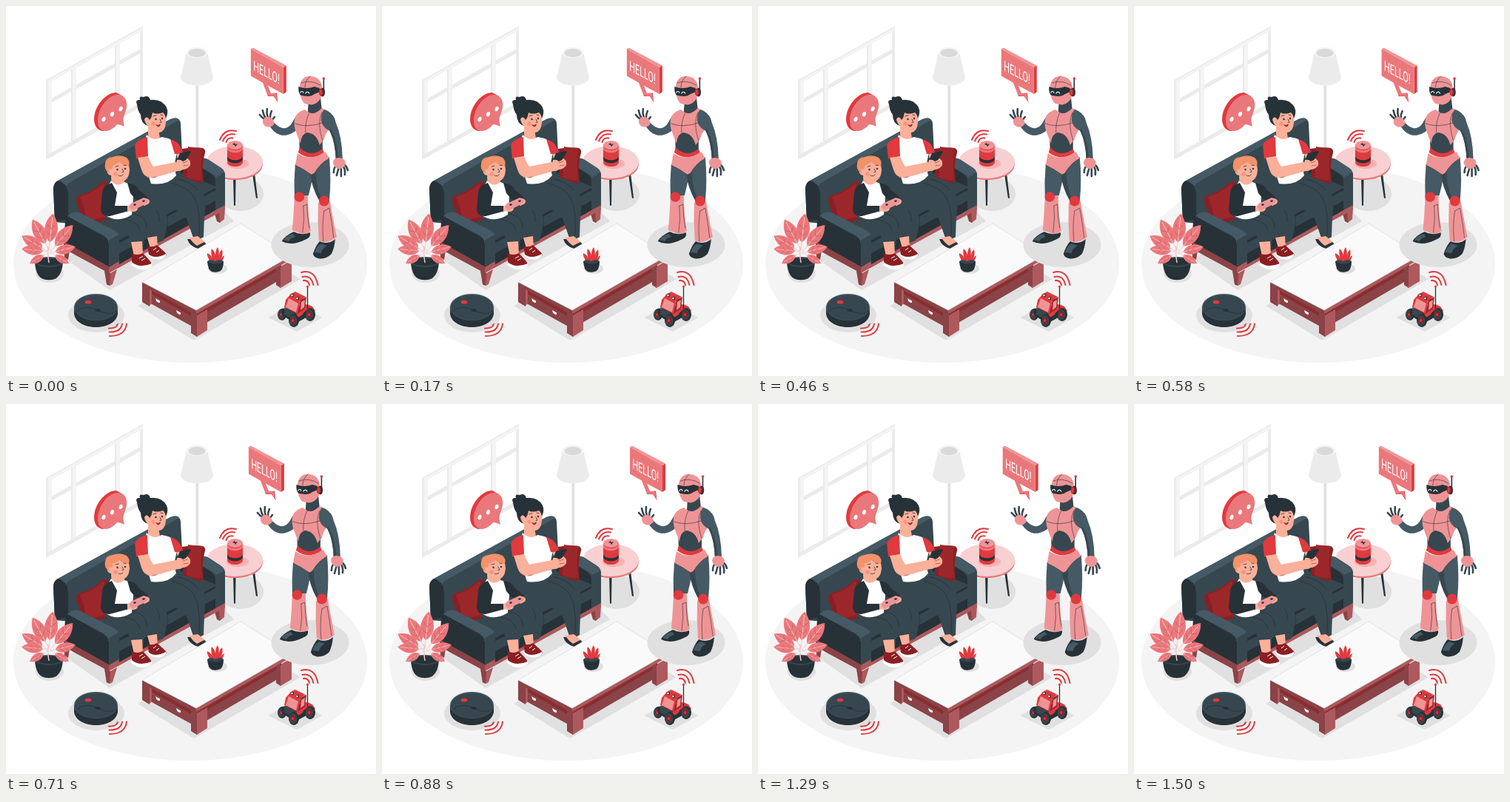
Write an HTML page that moves like this. It is 500 by 500 pixels and loops after 1.54 s.

```html
<!DOCTYPE html>
<html lang="en">
<head>
<meta charset="utf-8">
<title>Smart living room</title>
<style>
html, body { margin: 0; width: 100%; height: 100%; overflow: hidden; background: #fff; }
svg { display: block; width: 100vw; height: 100vh; }
.w { fill: #fff } .g0 { fill: #f4f4f4 } .g1 { fill: #ebebeb } .g2 { fill: #e0e0e0 }
.k { fill: #263238 } .d { fill: #37474f } .m { fill: #455a64 }
.r { fill: #e03a3e } .p { fill: #ea787b } .l { fill: #f8d0d2 } .q { fill: #ef9496 }
.b { fill: #8a1f23 } .c { fill: #9c272b } .t { fill: #8a4347 } .u { fill: #ad595d }
.s { fill: #fbb09a } .o { fill: #f1926a }
.ln { fill: none; stroke: #263238; stroke-linecap: round; stroke-linejoin: round; stroke-width: .8 }
.lr { fill: none; stroke: #a83a3f; stroke-width: .7; stroke-linecap: round }
.arc { fill: none; stroke: #e03a3e; stroke-width: 2; stroke-linecap: round }
.fin { fill: none; stroke: #37474f; stroke-width: 2.6; stroke-linecap: round }
.hello { font: 400 19px Roboto, "Open Sans", sans-serif; fill: #fff }
</style>
</head>
<body>
<svg viewBox="0 0 500 500">
<defs>
  <g id="leaf">
    <path class="p" d="M0-10C-11-18-11-34 0-46C11-34 11-18 0-10"/>
    <path d="M0 0V-42" fill="none" stroke="#f8c4c6" stroke-width=".9"/>
    <path class="lr" d="M0-18l-5-5M0-18l5-5M0-27l-5-5M0-27l5-5" opacity=".5"/>
  </g>
  <g id="wheel">
    <ellipse class="k" rx="7" ry="9"/>
    <ellipse class="d" cx="-1" rx="5.200" ry="7"/>
    <ellipse class="b" cx="-1" rx="3" ry="4.200"/>
    <ellipse class="r" cx="-1.400" rx="1.500" ry="2"/>
  </g>
</defs>

<ellipse class="g0" cx="249" cy="348" rx="239" ry="134"/>

<!-- window -->
<g transform="matrix(1 -.557 0 1 54 100)">
  <path class="g1" fill-rule="evenodd" d="M0 0H131V108H0ZM8 6V102H127V6Z"/>
  <path class="g0" d="M3 2H131V6H8V102H3Z"/>
  <path class="g1" d="M34 6h7v96h-7zM93 6h7v96h-7zM8 29H127v6H8z"/>
  <path class="g0" d="M36 6h5v96h-5zM95 6h5v96h-5z"/>
</g>

<!-- floor lamp -->
<path class="g2" d="M256.500 104h3.500v100h-3.500z"/>
<path class="g1" d="M244 63L236 96C237 111 279 111 280 96L272 63Z"/>
<ellipse class="g0" cx="258" cy="63" rx="14" ry="7.500"/>
<ellipse cx="258" cy="63.500" rx="11.500" ry="5.800" fill="#d9d9d9"/>

<!-- side table -->
<ellipse class="g2" cx="317" cy="254" rx="31" ry="23"/>
<path class="k" d="M307 231h3.500l-.5 38q-1 2-2 0zM333 227l3-1 4 33q-1 2-2.200 0zM279 225h3v30h-2z"/>
<path class="p" d="M271 210V214C273 242 345 242 347 214V210Z"/>
<ellipse class="l" cx="309" cy="211" rx="38" ry="22"/>
<ellipse class="q" cx="313" cy="213" rx="15" ry="7" opacity=".5"/>
<path class="r" d="M299 188V211C300 219 319 219 320 211V188Z"/>
<path class="k" d="M299 203C301 210 318 210 320 203V207C318 214 301 214 299 207Z"/>
<path class="p" d="M299 189C301 197 318 197 320 189V193C318 200 301 200 299 193Z"/>
<ellipse class="q" cx="309.500" cy="188" rx="10.500" ry="6"/>
<path class="k" d="M306 187l3-2 1 2 3-1-3 4-1-2z"/>
<path class="arc" d="M289 181Q295 165 311 169M293 182.500Q298 171 309 173.500M297.500 184Q300 177 306.500 178.500"/>

<!-- sofa -->
<path class="g2" d="M78 340L140 384 308 291 290 272Z"/>
<path class="u" d="M133 357l8 4 9-5-6 20-4 2-4-2zM282 281l14-8-1 15-6 5z"/>
<path class="t" d="M78 326l8 5-2 12-5-3zM133 357l8 4-1 17-4-2zM282 281l6-2 1 14-4-2z"/>
<path class="t" d="M78 316L139 350V361L78 328Z"/>
<path class="u" d="M139 350L296 262V275L139 361Z"/>
<path class="d" d="M64 247Q64 239 72 235L222 153Q235 148 236 159L240 240 150 300 66 292Z"/>
<path class="m" d="M72 235L222 153Q231 149 234 154L85 239Q81 242 82 247Q76 238 72 235Z"/>
<path class="k" d="M64 247Q64 239 70 236Q82 239 84 252V288L66 292Z"/>
<path class="k" d="M236 200L268 209 296 232V268L270 280 236 255Z"/>
<path class="d" d="M262 207Q268 204 274 208L291 219Q297 223 296 231V269L283 276V236Q282 230 276 226L258 215Z"/>
<path class="m" d="M262 207Q268 204 274 208L291 219Q294 221 295 225L284 231Q282 228 276 225L258 214Z"/>
<path class="d" d="M120 290L240 225 283 244V252L154 322Z"/>
<path class="k" d="M150 318L283 246V276L153 349Z"/>
<path class="d" d="M152 321L283 249V263L152 335Z"/>
<path class="ln" d="M154 336L282 265M218 285V300"/>

<!-- cushions -->
<path class="b" d="M238 193Q254 190 266 192Q271 194 268 202Q264 219 267 235Q266 240 261 239L240 233Z"/>
<path class="c" d="M246 190Q256 192 266 192Q262 210 265 235Q252 236 244 231Z"/>
<path class="b" d="M95 263Q94 258 99 256Q118 250 130 238Q136 235 139 241L149 284Q148 289 140 289Q123 291 111 297Q106 298 104 292Z"/>
<path class="c" d="M100 258Q120 251 132 239Q137 263 146 284Q124 285 109 293Q107 273 100 258Z"/>

<!-- woman -->
<path class="s" d="M192 160L206 166 208 179Q201 187 192 178Z"/>
<path class="s" d="M187 153Q187 148 191 150L196 142 214 141Q217 150 216 158Q215 170 207 171Q199 171 194 163Q187 160 187 153Z"/>
<path class="k" d="M177 133q-3-7 4-6-2-6 5-4 7-3 9 4Q210 125 217 137Q220 144 216 152Q215 146 212 144Q203 147 198 144Q197 151 194 154Q190 147 187 153Q188 159 192 162Q182 159 182 147Q178 142 177 133Z"/>
<path class="ln" d="M199 149l4-1.500M209 147l3 .5M208 153l2 4-2 .5"/>
<circle class="k" cx="202.500" cy="153" r="1.200"/><circle class="k" cx="211" cy="152" r="1.200"/>
<path class="c" d="M202 160q4 2 7-1-1 5-4 4-2-1-3-3"/>
<circle class="r" cx="199" cy="159" r="2.500" opacity=".25"/>
<path class="d" d="M197 239Q220 228 240 232Q260 235 267 251Q271 264 268 284L267 312 255 319 244 287 233 277Q200 268 197 239Z"/>
<path class="ln" d="M224 239Q247 245 255 260T261 310M233 234Q250 237 259 249"/>
<path class="s" d="M247 313l12-2 9 7q2 4-2 5l-9 3q-7-6-10-13"/>
<path class="k" d="M245 315l4 0q4 6 9 9l10-5q3 2 2 4l-10 5q-12-3-15-13"/>
<path class="w" d="M190 174Q200 184 210 177Q222 178 229 185L230 203Q226 217 230 229Q219 243 196 240Q188 214 182 203Z"/>
<path class="r" d="M191 177Q177 180 174 188L176 206Q185 206 192 203Z"/>
<path class="r" d="M222 180Q233 183 236 191L238 199 228 200Z"/>
<path class="s" d="M178 205L192 203Q195 211 199 217L229 211Q237 208 242 214Q240 224 232 223L200 232Q187 234 183 221Z"/>
<path class="s" d="M230 200L239 199 246 207Q250 209 249 215Q245 222 237 220Z"/>
<path class="k" d="M235 199l13-3q3 0 1 3l-9 14-10-2z"/>
<path class="s" d="M231 208q5-1 8 2l7-3q3 2 0 4 4 1 1 4-1 5-7 6-8 1-10-5z"/>
<path class="lr" d="M239 212l6-2M240 216l6-1M198 232l5-1"/>

<!-- boy -->
<path class="s" d="M142 230L160 234 160 243Q151 252 143 243Z"/>
<path class="d" d="M150 283Q170 274 186 272Q205 269 216 281Q221 288 213 317L199 322 194 299 168 304Z"/>
<path class="d" d="M134 285Q151 279 178 283Q191 285 190 299L185 328 170 327 165 309Q139 308 134 285Z"/>
<path class="ln" d="M150 288Q177 287 181 303M190 299Q190 290 182 284L168 279M203 276Q208 281 207 292"/>
<path class="s" d="M169 319l15-1 1 18-12 2zM191 313l13-2 1 17-9 3z"/>
<path class="b" d="M170 334q7 4 15 0l10 11q4 5-3 7-11 5-22-5z"/>
<path class="b" d="M191 324q6 3 13-1l11 10q4 5-2 7-9 5-20-4z"/>
<path class="w" d="M170 346q10 9 27 2v3q-12 11-28-1zM192 335q9 8 24 0v3q-9 9-24 0z"/>
<path d="M180 341l5-3M183 344l5-3M199 330l4-3M203 333l4-3" stroke="#fff" stroke-width="1" fill="none"/>
<path class="w" d="M142 236Q150 246 160 238Q170 240 173 248L170 282Q151 294 135 283L137 245Z"/>
<path class="k" d="M143 239Q131 242 130 252L128 275Q129 285 140 284L166 277 165 270 147 270 150 252Z"/>
<path class="k" d="M164 239Q177 241 179 248L191 258Q196 264 189 267L175 261 168 253Z"/>
<path class="s" d="M137 222Q136 212 146 208L160 208Q167 212 167 222Q166 236 156 237Q145 237 142 229Q136 228 137 222Z"/>
<path class="o" d="M140 226Q132 222 134 213Q134 205 144 204Q155 200 163 205Q168 209 166 216Q159 216 153 211Q148 215 145 215L143 221Q138 218 140 226Z"/>
<path class="ln" d="M148 217l4-1M159 215l3 .5M157 220l2 4-2 .5M152 229q4 2 6-1"/>
<circle class="k" cx="150.500" cy="221" r="1.200"/><circle class="k" cx="161" cy="220" r="1.200"/>
<circle class="r" cx="148" cy="227" r="2.600" opacity=".25"/>
<path class="s" d="M164 270l8-2 6 5q0 5-7 5l-7-1zM184 260l6 0q6 2 3 7l-6 3-5-4z"/>
<path class="q" d="M167 272Q166 267 173 265L186 259Q192 260 192 265L188 268 174 275Q169 278 167 272Z"/>
<path class="k" d="M172 268l3-1 1 2-3 1zM184 263l3-1 1 2-3 1z"/>

<!-- near sofa arm -->
<path class="k" d="M80 292Q80 282 88 284L132 308Q139 313 139 321V352L78 318Z"/>
<path class="d" d="M83 284Q91 276 99 279L146 303Q154 307 153 317V345L139 353V321Q138 314 130 310Z"/>
<path class="m" d="M83 284Q91 276 99 279L146 303Q150 305 152 309L138 317Q136 312 130 309Z"/>

<!-- chat bubble -->
<path class="r" d="M119 153C119 136 134 117 149 117L158 122 132 169C124 169 119 162 119 153Z"/>
<path class="p" d="M124 155C124 138 138 120 151 120C164 120 166 134 160 147Q157 152 160 163Q154 160 150 160C138 174 124 171 124 155Z"/>
<g class="w"><ellipse cx="132" cy="153" rx="2.400" ry="3.400" transform="rotate(20 132 153)"/><ellipse cx="143.500" cy="146" rx="2.400" ry="3.400" transform="rotate(20 143 146)"/><ellipse cx="155" cy="139" rx="2.400" ry="3.400" transform="rotate(20 155 139)"/></g>

<!-- potted plant -->
<ellipse class="g2" cx="59" cy="361" rx="19" ry="13"/>
<path class="k" d="M39 346Q40 365 50 369Q60 372 68 368Q76 362 77 346Z"/>
<ellipse class="d" cx="58" cy="346" rx="19" ry="7"/>
<ellipse class="k" cx="58" cy="346" rx="16" ry="5"/>
<path d="M58 347Q56 335 57 325" fill="none" stroke="#f8c4c6" stroke-width="1.500"/>
<use href="#leaf" transform="translate(58 330) rotate(-28) scale(1.020)"/>
<use href="#leaf" transform="translate(58 330) rotate(6) scale(1.080)"/>
<use href="#leaf" transform="translate(60 332) rotate(40) scale(1.020)"/>
<use href="#leaf" transform="translate(57 332) rotate(-59) scale(.9)"/>
<use href="#leaf" transform="translate(59 334) rotate(76) scale(.78)"/>
<use href="#leaf" transform="translate(58 332) rotate(-84) scale(.8)"/>
<use href="#leaf" transform="translate(56 334) rotate(-120) scale(.6)"/>
<use href="#leaf" transform="translate(61 334) rotate(120) scale(.6)"/>

<!-- robot vacuum -->
<ellipse class="g2" cx="122" cy="418" rx="38" ry="23"/>
<path class="k" d="M92 407V416C95 440 148 440 151 416V407Z"/>
<ellipse class="m" cx="121.500" cy="407" rx="29.500" ry="18"/>
<ellipse class="d" cx="121.500" cy="407.500" rx="28.500" ry="17"/>
<path class="ln" d="M96 413Q107 402 124 411T149 412M117 425v8M102 421v7"/>
<ellipse class="k" cx="124" cy="411" rx="3.500" ry="2"/>
<ellipse class="r" cx="111" cy="400" rx="4.200" ry="2.600"/>
<path class="arc" d="M163 429.500Q161 446 140 446M157 429.500Q155 441 139.500 440.500M151 430Q149 436 139 435.500"/>

<!-- coffee table -->
<path class="g2" d="M178 405L254 452 398 369 324 324Z"/>
<path class="t" d="M190 378L257 415V436L190 399Z"/>
<path class="t" d="M257 414L372 348V369L257 436Z"/>
<path class="b" d="M190 380L257 418V423L190 385Z" opacity=".6"/>
<path class="b" d="M257 417L386 343V347L257 422Z" opacity=".6"/>
<path class="t" d="M184 376L194 382V406L184 400ZM250 412L258 416V447L250 442ZM365 350L371 353V381L365 377Z"/>
<path class="u" d="M194 382l3 2v18l-3 3zM258 418L272 410V438L258 447ZM371 353L386 344V372L371 381Z"/>
<path class="w" d="M202 395l6 3.500v2.500q-5 0-6-6M230 411l6 3.500v2.500q-5 0-6-6"/>
<path class="t" d="M184 373L257 411V416L184 378Z"/>
<path class="u" d="M257 411L386 337V342L257 416Z"/>
<path fill="#fafafa" stroke="#d8d8d8" stroke-width=".7" d="M184 373L317 294 386 337 257 411Z"/>
<ellipse class="g2" cx="286" cy="355" rx="13" ry="7"/>
<path class="r" d="M276 345Q271 338 272 334Q278 337 279 341Q276 332 278 328Q283 333 283 338Q283 329 286 326Q289 332 287 339Q289 331 292 329Q294 336 290 342Q292 338 295 337Q294 343 289 348H278Z"/>
<path class="k" d="M272 345Q273 357 278 359Q284 361 290 358Q294 354 294 345Z"/>
<path class="d" d="M272 345Q276 341 283 345Q290 341 294 345Q284 352 272 345Z"/>

<!-- toy tractor -->
<path class="g2" d="M354 421L391 401 427 421 393 440Z"/>
<use href="#wheel" transform="translate(373 417) scale(.85)"/>
<path class="k" d="M372 409L404 405 413 417 391 429 373 418Z"/>
<path class="r" d="M395 406Q404 400 414 406L418 412 414 416Q406 406 400 418L391 423Z"/>
<path class="d" d="M376 408L391 415V425L376 417Z"/>
<path class="r" d="M378 397L384 390 398 397 394 416 376 407Z"/>
<path class="q" d="M382 395L395 402 392 414 378 407Z"/>
<path class="c" d="M398 397L406 393 404 409 394 416Z"/>
<path class="q" d="M399 400l5-3-1 10-5 4z"/>
<path class="r" d="M383 390L391 386 405 393 397 398Z"/>
<circle class="k" cx="387" cy="391" r="2.200"/><circle class="k" cx="394" cy="395" r="2.200"/>
<circle class="w" cx="386.500" cy="391" r="1.200"/><circle class="w" cx="393.500" cy="395" r="1.200"/>
<use href="#wheel" transform="translate(389 425)"/>
<use href="#wheel" transform="translate(411 417)"/>
<path class="ln" d="M407.500 379V408" style="stroke-width:1.300"/>
<circle class="r" cx="407.500" cy="379" r="1.600"/>
<path class="arc" d="M399 360Q417 355 421.500 377M400.500 366Q412 363 415.500 377M402 371Q408 370 410 377"/>

<ellipse class="g2" cx="411" cy="322.500" rx="52.500" ry="30.500"/>

<g id="robot">
  <!-- speech sign -->
  <path class="q" d="M331 58L334 56.500 379 80.500 375 83Z"/>
  <path class="r" d="M375 83L379 80.500V116L375 119Z"/>
  <path class="r" d="M352 106L358 118 366 117.500 367.500 130 362 122 354 122Z"/>
  <path class="p" d="M331 58L375 83V119L354 107.500 358 118 365 118 367.500 130 362 121.500 354 121.500 347 103.500 331 94.500Z"/>
  <text class="hello" transform="matrix(.57 .3 0 1 334.500 87)">HELLO!</text>

  <!-- far leg -->
  <path class="m" d="M391 214Q402 216 415 226Q413 242 409 256L390 258Q389 236 391 214Z"/>
  <path class="q" d="M390 259L408 256Q408 280 412 304L404 309 387 303Q389 280 390 259Z"/>
  <path class="ln" style="stroke-width:.6" d="M402 270L407 268Q407 282 410 300M402 270Q404 288 401 306"/>
  <circle class="r" cx="396.500" cy="258" r="6.800"/>
  <path class="k" d="M373 318Q376 311 389 305Q400 311 411 306Q413 313 404 316Q386 325 373 318Z"/>
  <path class="m" d="M375 316Q379 310 388 308L391 312Q385 313 382 318Z"/>

  <!-- near leg -->
  <path class="m" d="M411 226Q423 209 437 204Q440 235 437 264L423 262Q414 246 411 226Z"/>
  <path class="d" d="M411 226Q414 218 420 213Q416 238 427 262L423 262Q414 246 411 226Z"/>
  <path class="q" d="M422 266L438 264Q443 292 447 312Q436 322 423 317Q421 292 422 266Z"/>
  <path class="ln" style="stroke-width:.6" d="M430 277L437 273Q441 295 443 313M430 277Q427 295 429 318"/>
  <circle class="r" cx="430" cy="263.500" r="7"/>
  <path class="k" d="M415 335Q418 325 424 318Q436 323 445 315Q444 327 440 335Q433 342 424 341.500Q416 340 415 335Z"/>
  <path class="m" d="M417 333Q420 324 426 321L434 324Q427 328 426 334Z"/>

  <!-- raised arm -->
  <path class="m" d="M395 146C388 152 387 163 378 165C371 166 366 161 362 157L357 163C363 172 372 177 381 174C390 172 395 166 398 159Z"/>
  <path class="fin" d="M351 154Q347 152 343 147M351 152Q348 147 347 141M354 151Q352 145 353 139M357 152Q357 146 359 142M359 155L363 150"/>
  <path class="q" d="M347 155Q349 149 356 150Q362 152 363 159Q359 165 352 163Q347 161 347 155Z"/>

  <!-- lowered arm -->
  <path class="m" d="M432 142Q444 145 446 158Q454 176 455 206L446 208Q445 184 438 168L430 164Z"/>
  <path class="d" d="M433 162Q438 164 440 168Q449 186 449 208L446 208Q445 184 438 170Z"/>
  <path class="fin" d="M447 215Q443 218 443 225M450 218L447 229M453 218L453 230M456 217Q459 221 458 228M457 214Q461 217 462 222"/>
  <path class="q" d="M442 212Q442 206 449 205Q458 205 459 212Q458 220 450 220Q444 219 442 212Z"/>

  <!-- body -->
  <path class="d" d="M409 126L425 122 427 141Q417 150 408 143Z"/>
  <path class="d" d="M396 170H428V197Q412 207 397 197Z"/>
  <path class="q" d="M404 140Q394 143 391 150Q388 160 392 170L398 186Q399 173 407 171Q420 172 424 188L430 180Q432 172 437 166Q443 150 434 141L427 138Q416 149 408 143Z"/>
  <path class="m" d="M430 140Q442 143 443 154Q443 164 436 168Q427 163 426 154Q426 144 430 140Z"/>
  <path class="ln" style="stroke-width:.6" d="M410 144Q404 157 405 171M391 159Q407 165 427 158M427 144Q420 158 428 182"/>
  <path class="r" d="M397 191Q411 206 428 193L430 198Q412 211 395 198Z"/>
  <path class="q" d="M394 199Q411 211 432 197L437 206Q425 212 417 226L413 228Q402 220 391 215Z"/>
  <path class="ln" style="stroke-width:.5" d="M391 215Q402 220 413 228L417 226Q425 212 437 206"/>

  <!-- head -->
  <path class="q" d="M397 109C398 98 406 94 413 95C424 96 429 105 427 117C427 125 422 132 413 133.500L404 132Q399 128 398 120Z"/>
  <path class="ln" style="stroke-width:.6" d="M411 95Q404 101 404 110M399 104Q412 99 425 107"/>
  <path class="k" d="M395.500 109Q406 113 417 109L424 111V116L417 119Q411 124 398 120.500Q395 117 395.500 109Z"/>
  <path d="M398 117q2-3.500 4 0M405 118q2.500-4 5 0" fill="none" stroke="#fff" stroke-width="1.200" stroke-linecap="round"/>
  <path class="ln" d="M429.500 113V99" style="stroke-width:1.600"/>
  <circle class="r" cx="429.500" cy="98" r="1.800"/>
  <ellipse class="k" cx="428" cy="116.500" rx="3.200" ry="6"/>
  <ellipse class="c" cx="426" cy="116.500" rx="3" ry="5"/>
  <ellipse class="r" cx="425.500" cy="116.500" rx="1.800" ry="3.400"/>
</g>
</svg>
<script>
// Sideways shake: one value every 150 ms, linear in between, drawn at 24 fps.
const shake = [0, -1, 2, -4, 4, -4, 4, -4, 2, -1, 0];
const LOOP = 1540, STEP = 1000 / 24, PHASE = 25;
const robot = document.getElementById('robot');

function offset(ms) {
  const pos = (ms % 1500) / 150, i = Math.floor(pos);
  return shake[i] + (shake[i + 1] - shake[i]) * (pos - i);
}

function draw() {
  const t = performance.now() % LOOP;
  const tick = Math.min(36, Math.floor((t + 4) / STEP));
  robot.setAttribute('transform', `translate(${offset(tick * STEP + PHASE).toFixed(2)} 0)`);
  requestAnimationFrame(draw);
}
draw();
</script>
</body>
</html>
```
